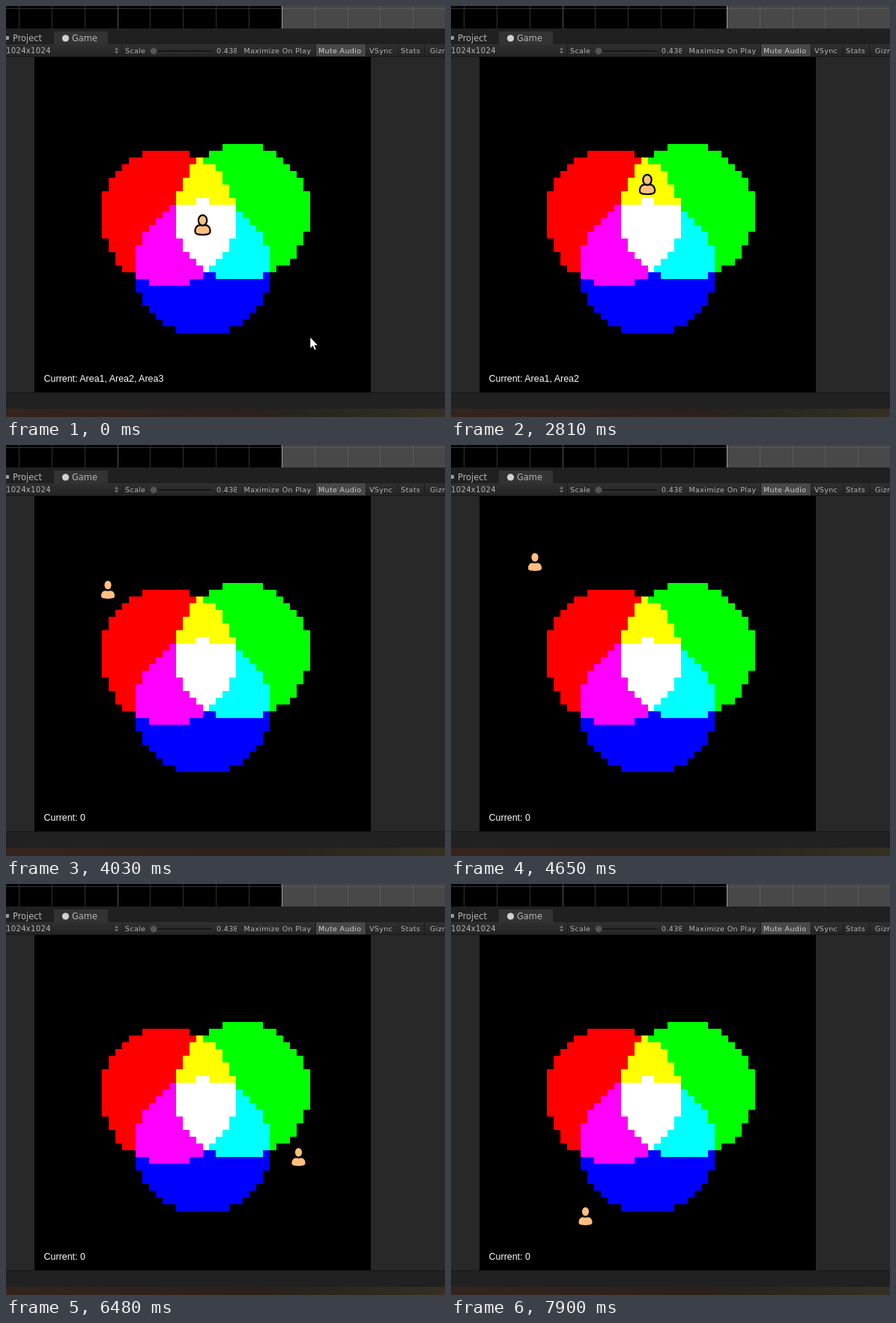
These frames come from a looping animation (586x548 px, 8000 ms). An HTML page:

```html
<!DOCTYPE html>
<html lang="en">
<head>
<meta charset="utf-8">
<title>Overlapping areas</title>
<style>
  html, body { margin: 0; width: 100%; height: 100%; overflow: hidden; background: #282828; }
  svg { display: block; width: 586px; height: 548px; }
  .ui { font-family: "DejaVu Sans", sans-serif; font-size: 9.5px; letter-spacing: .35px; fill: #b4b4b4; }
  .tab { font-family: "DejaVu Sans", sans-serif; font-size: 11.4px; fill: #b4b4b4; }
  .status { font-family: "Liberation Sans", Arial, sans-serif; font-size: 12.45px; fill: #fff; }
  .crisp { shape-rendering: crispEdges; }
</style>
</head>
<body>
<svg viewBox="0 0 586 548">
  <defs>
    <linearGradient id="bar" x2="0" y2="1">
      <stop stop-color="#303030"/><stop offset="1" stop-color="#232323"/>
    </linearGradient>
    <linearGradient id="floor">
      <stop stop-color="#35241e"/><stop offset=".56" stop-color="#2c201a"/>
      <stop offset=".66" stop-color="#28241c"/><stop offset="1" stop-color="#353022"/>
    </linearGradient>
    <clipPath id="scaleClip"><rect x="278" y="51" width="30" height="17"/></clipPath>
  </defs>

  <rect width="586" height="548" fill="#282828"/>
  <g class="crisp">
    <rect width="368" height="30" fill="#000"/>
    <rect x="368" width="218" height="30" fill="#484848"/>
    <g id="timeline"></g>
    <rect y="30" width="586" height="21" fill="#202020"/>
    <rect x="64" y="34" width="72" height="17" fill="#333"/>
    <rect y="51" width="586" height="17" fill="url(#bar)"/>
    <rect x="414" y="51" width="66" height="17" fill="#484848"/>
    <path d="M155.500 51v17M413.500 51v17M480.500 51v17M523.500 51v17M558.500 51v17" stroke="#1c1c1c"/>
    <rect y="67" width="586" height="1" fill="#191919"/>
    <rect x="38" y="68" width="449" height="447" fill="#000"/>
    <rect y="515" width="586" height="22" fill="#212121"/>
    <rect y="515" width="586" height="1" fill="#171717"/>
    <rect y="537" width="586" height="11" fill="url(#floor)"/>
  </g>

  <rect x="-3" y="40" width="7" height="5" rx="1" fill="#9a9a9a"/>
  <text class="tab" x="9" y="47">Project</text>
  <circle cx="79.500" cy="43" r="4.600" fill="#d0d0d0"/>
  <text class="tab" x="88" y="47">Game</text>

  <g class="ui">
    <text x="0" y="63" font-size="10" style="font-size:10px">1024x1024</text>
    <path d="M145 58.500l2.500-3 2.500 3zM145 60.500l2.500 3 2.500-3z" fill="#808080"/>
    <text x="159" y="63">Scale</text>
    <rect x="193" y="59" width="82" height="3" rx="1.500" fill="#171717"/>
    <rect x="193" y="61.500" width="82" height="1" fill="#3a3a3a"/>
    <circle cx="197" cy="60" r="4.500" fill="#555" stroke="#3c3c3c"/>
    <text x="281" y="63" clip-path="url(#scaleClip)">0.438</text>
    <text x="317.500" y="63">Maximize On Play</text>
    <text x="417" y="63" fill="#d0d0d0">Mute Audio</text>
    <text x="485" y="63">VSync</text>
    <text x="527" y="63">Stats</text>
    <text x="566" y="63">Gizmos</text>
  </g>

  <g id="cells" class="crisp"></g>
  <text id="status" class="status" x="50.600" y="501"></text>

  <g id="person" fill="#ffbf7f" stroke="#000" stroke-width="2.200">
    <path d="M-10.200 8C-10.200 3 -7 .200 -3.500 .200H3.500C7 .200 10.200 3 10.200 8C10.200 11.500 8 13 0 13S-10.200 11.500 -10.200 8Z"/>
    <ellipse cy="-6.200" rx="5.700" ry="6.900"/>
  </g>
  <path id="cursor" d="M406 441.500v15l3.500-3.200 2.400 5.500 2.300-1-2.400-5.300h4.700z"
        fill="#fff" stroke="#000" stroke-width=".6"/>
</svg>

<script>
const LOOP = 8000, CELL = 8.98, LEFT = 38, TOP = 184.4;
const $ = id => document.getElementById(id);

function add(parent, tag, attrs) {
  const el = document.createElementNS("http://www.w3.org/2000/svg", tag);
  for (const k in attrs) el.setAttribute(k, attrs[k]);
  parent.appendChild(el);
}

// Timeline ruler
const line = (x, y, width, height, fill) => add($("timeline"), "rect", { x, y, width, height, fill });
line(0, 3, 368, 1, "#333");
line(368, 3, 218, 1, "#5a5a5a");
for (let i = 0; i < 13; i++) {
  const x = Math.round(17 + i * 43.85);
  line(x, 0, 1, 30, i === 8 ? "#a0a0a0" : i > 8 ? "#5a5a5a" : i === 3 ? "#555" : "#303030");
}

// Each area is a disc on the grid; overlaps mix additively.
const discs = [
  { x: 19.89, y: 10.89 },
  { x: 30.89, y: 10.11 },
  { x: 25, y: 18.41 }
];
const colorAt = (c, r) => "#" + discs.map(d =>
  Math.hypot(c + .5 - d.x, r + .5 - d.y) < 10 ? "f" : "0").join("");

for (let r = 0; r < 28; r++) {
  const y = Math.round(TOP + r * CELL), bottom = Math.round(TOP + (r + 1) * CELL);
  for (let c = 10, end; c < 41; c = end) {
    const fill = colorAt(c, r);
    for (end = c + 1; end < 41 && colorAt(end, r) === fill;) end++;
    if (fill === "#000") continue;
    const x = Math.round(LEFT + c * CELL);
    add($("cells"), "rect", { x, y, width: Math.round(LEFT + end * CELL) - x, height: bottom - y, fill });
  }
}

// Start time, x, y, areas under the person
const steps = [
  [0, 262.5, 292, "123"], [1990, 262.5, 289.5, "123"], [2210, 262.5, 267, "123"], [2410, 263, 234.5, "12"],
  [2810, 262, 238, "12"], [3010, 258, 250, "12"], [3210, 246, 263, "12"], [3430, 226.5, 268, "12"],
  [3630, 195, 254, "1"], [3830, 164.5, 227.5, "1"], [4030, 136, 193, ""], [4250, 113, 170.5, ""],
  [4650, 112, 156, ""], [4850, 130, 121, ""], [5050, 199, 105.5, ""], [5270, 292, 122, ""],
  [5470, 361.5, 173.5, ""], [5670, 361.5, 220.5, "2"], [5870, 361.5, 243, "2"],
  [6280, 369, 276, "2"], [6480, 390.5, 364, ""], [6680, 408, 389, ""], [6880, 386, 406, ""],
  [7100, 343, 409, ""], [7300, 293.5, 403.5, "3"], [7500, 257, 421, "3"], [7700, 213, 437, ""], [7900, 179.5, 443, ""]
];

function draw(t) {
  const [, x, y, areas] = steps.filter(s => s[0] <= t).pop();
  $("person").setAttribute("transform", `translate(${x} ${y})`);
  $("status").textContent = "Current: " + ([...areas].map(n => "Area" + n).join(", ") || "0");
  $("cursor").setAttribute("visibility", t < 200 ? "visible" : "hidden");
}

const start = performance.now();
function tick() {
  draw((performance.now() - start) % LOOP);
  requestAnimationFrame(tick);
}
tick();
</script>
</body>
</html>
```
